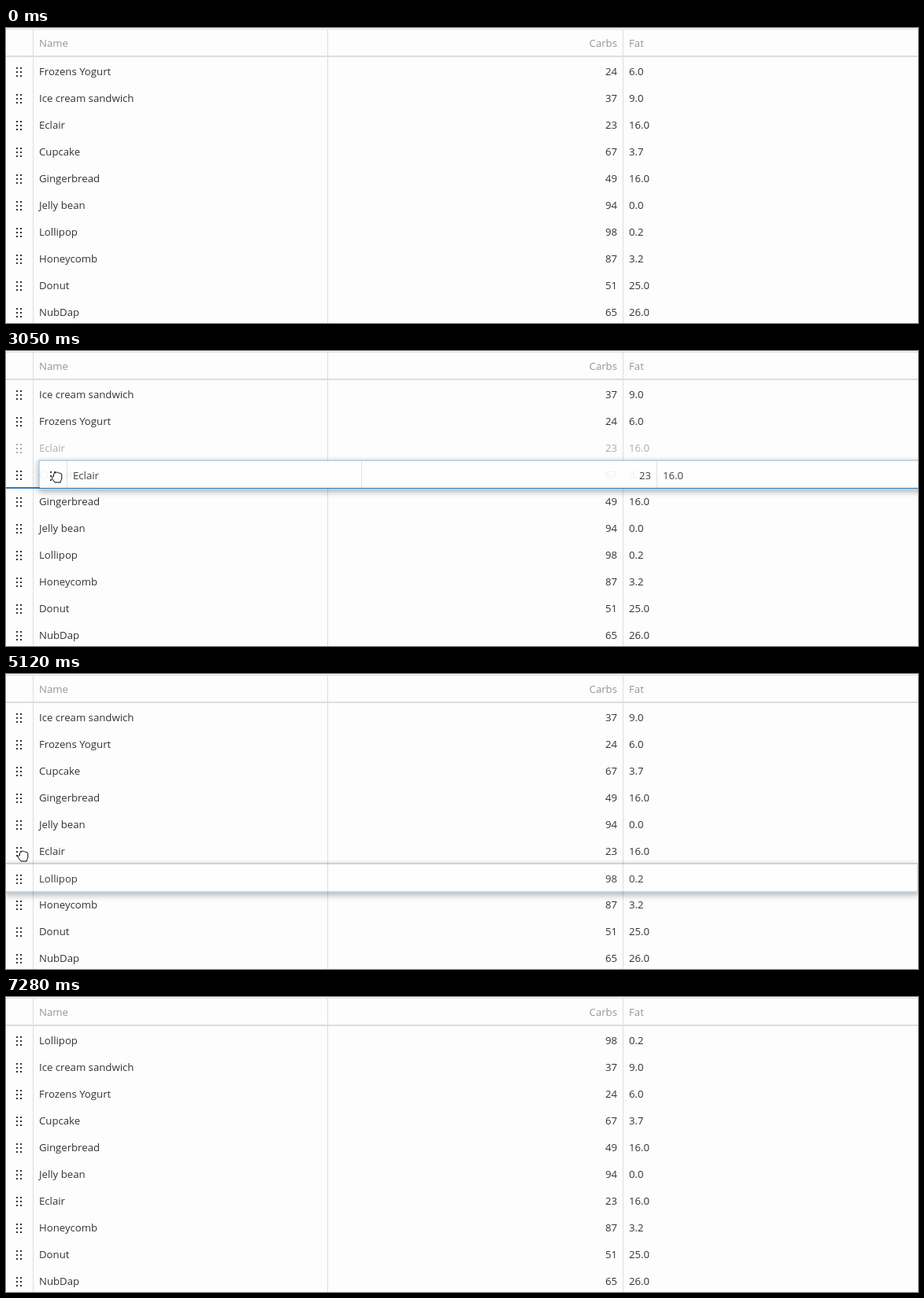
Animation, 1158 px wide and 375 px high, one loop 7940 ms. Source, as an HTML page:

```html
<!DOCTYPE html>
<html lang="en">
<head>
<meta charset="utf-8">
<title>Row reordering</title>
<style>
html, body { margin: 0; width: 100%; height: 100%; overflow: hidden; background: #fdfdfd; }
body { position: relative; font: 13.2px "Open Sans", "Noto Sans", sans-serif; color: #333; }
.row { display: flex; height: 34px; width: 1158px; line-height: 36px; white-space: nowrap; }
.row > * { box-sizing: border-box; flex: none; width: 375px; padding: 0 7px; border-right: 1px solid #ddd; }
.row > :nth-child(1) { width: 35px; padding: 0; }
.row > :nth-child(2) { width: 374px; }
.row > :nth-child(3) { text-align: right; }
.row > :nth-child(4) { border: 0; }
.row svg { display: block; fill: #333; }
.head { position: absolute; top: 1px; height: 33px; line-height: 34px; color: #959595;
  border-top: 1px solid #ddd; border-bottom: 2px solid #ddd; }
#rows { position: absolute; top: 37px; }
.dim > * > * { opacity: .4; }
#line { position: absolute; left: 0; width: 100%; height: 2px; background: #337ab7; }
#box { position: absolute; left: -2px; top: -2px; box-sizing: border-box; width: 1161px; height: 38px;
  overflow: hidden; border: 2px solid rgba(51,122,183,.32); opacity: .92;
  box-shadow: 0 3px 8px rgba(0,0,0,.33); }
#box .row { background: #fff; }
#cursor { position: absolute; left: 0; top: 0; overflow: visible; fill: #fff; stroke: #000; }
</style>
</head>
<body>
<div class="row head"><div></div><div>Name</div><div>Carbs</div><div>Fat</div></div>
<div id="rows"></div>
<div id="line"></div>
<div id="box"></div>
<svg id="cursor" width="1" height="1"><path/></svg>
<script>
const LOOP = 7940, TOP = 37, ROW = 34, LAG = 60;
const el = id => document.getElementById(id);
const [rows, line, box, cursor] = ['rows', 'line', 'box', 'cursor'].map(el);

const data = [
  ['Frozens Yogurt', 24, '6.0'], ['Ice cream sandwich', 37, '9.0'], ['Eclair', 23, '16.0'],
  ['Cupcake', 67, '3.7'], ['Gingerbread', 49, '16.0'], ['Jelly bean', 94, '0.0'],
  ['Lollipop', 98, '0.2'], ['Honeycomb', 87, '3.2'], ['Donut', 51, '25.0'], ['NubDap', 65, '26.0']
];

// Each drag: start, drop, row index before and after, grab point
const drags = [
  { start: 870, end: 1700, from: 0, to: 1, x: 13, y: 57 },
  { start: 2730, end: 4020, from: 2, to: 5, x: 21, y: 125 },
  { start: 4840, end: 6520, from: 6, to: 0, x: 22, y: 259 }
];

// Pointer moves: start, end, then the point reached
const entry = [644, 273];
const moves = [
  [70, 750, 13, 57], [870, 1640, 16, 97], [1700, 2180, 21, 127],
  [2730, 2990, 64, 160], [3070, 3540, 33, 230], [4020, 4780, 22, 260],
  [5080, 5600, 18, 68], [5700, 6440, 20, 53], [6520, 7280, 740, 385]
];

const shapes = {
  arrow: 'M0 0V16.5L3.8 13l2.4 5.7 2.3-1-2.4-5.5H11.5z',
  move: 'M0-11L4-7H1.5V-1.5H7V-4L11 0 7 4V1.5H1.5V7H4L0 11-4 7H-1.5V1.5H-7V4L-11 0-7-4V-1.5H-1.5V-7H-4zM-1.5-1.5h3v3h-3z',
  grab: 'M-4-1V-4q.5-1.7 2-1.2 .6-1.4 2-1.2t1.8 1q1.2-.8 2.2.4 2-.3 2.3 1.8V1.5q-.3 2-1.5 3.5V6.5H-2.5L-6 2q-1-2 .5-2.7z'
};

let dots = '';
for (let i = 0; i < 6; i++) dots += `<rect x="${13 + i % 2 * 5}" y="${13 + (i >> 1) * 5}" width="2" height="2"/>`;
const handle = `<svg width="34" height="34">${dots}</svg>`;

const rowHtml = (cells, dim) => `<div class="row${dim ? ' dim' : ''}">` +
  [handle, ...cells].map(c => `<div><span>${c}</span></div>`).join('') + '</div>';

const easeOut = u => 1 - (1 - u) ** 2;

function pointer(t) {
  let [x, y] = entry;
  for (const [start, end, toX, toY] of moves) {
    if (t < start) break;
    const k = easeOut(Math.min(1, (t - start) / (end - start)));
    x += (toX - x) * k;
    y += (toY - y) * k;
  }
  return [Math.round(x), Math.round(y)];
}

function setRows(t, drag) {
  const list = data.slice();
  for (const d of drags) if (t >= d.end) list.splice(d.to, 0, list.splice(d.from, 1)[0]);
  rows.innerHTML = list.map((r, i) => rowHtml(r, drag && i === drag.from)).join('');
  box.innerHTML = drag ? rowHtml(list[drag.from]) : '';
}

let state;
function draw(t) {
  const drag = drags.find(d => t >= d.start && t < d.end);
  const key = drags.filter(d => t >= d.end).length + (drag ? '+' : '');
  if (key !== state) setRows(t, drag);
  state = key;

  const [x, y] = pointer(t);
  box.hidden = line.hidden = !drag;
  if (drag) {
    // The dragged row trails the pointer a little
    const [bx, by] = pointer(Math.max(t - LAG, drag.start));
    box.style.transform = `translate(${bx - drag.x}px,${by - drag.y + TOP + ROW * drag.from}px)`;
    const slot = Math.round((y - TOP) / ROW);
    line.hidden = slot === drag.from || slot === drag.from + 1;
    line.style.top = TOP + ROW * slot + 'px';
  }
  cursor.style.display = t >= 70 && t < 7280 ? '' : 'none';
  cursor.style.transform = `translate(${x + .5}px,${y + .5}px)`;
  cursor.firstChild.setAttribute('d', shapes[drag ? 'grab' : x < 34 ? 'move' : 'arrow']);
}

const begin = performance.now();
function tick() {
  draw((performance.now() - begin) % LOOP);
  requestAnimationFrame(tick);
}
tick();
</script>
</body>
</html>
```
